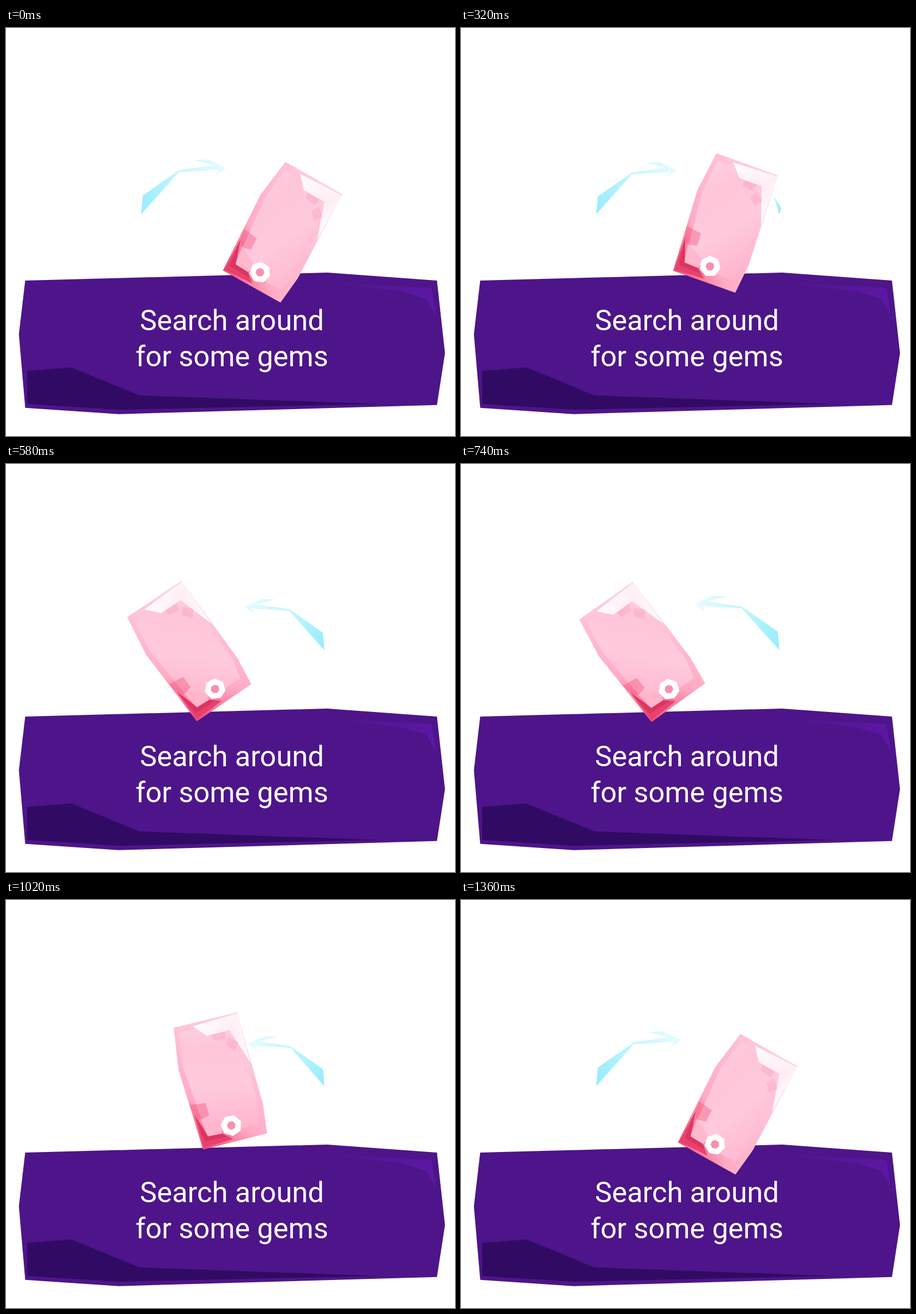
An HTML page that plays this animation: 784x714 px, repeating every 1480 ms.

```html
<!DOCTYPE html>
<html lang="en">
<head>
<meta charset="utf-8">
<title>Search around for some gems</title>
<style>
  html, body { margin: 0; width: 100%; height: 100%; overflow: hidden; background: #fff; }
  svg { display: block; width: 784px; height: 714px; }
  text { font: 400 50px Roboto, sans-serif; fill: #fff; text-anchor: middle; }
</style>
</head>
<body>
<svg viewBox="0 0 784 714">
  <defs>
    <linearGradient id="ice" gradientUnits="userSpaceOnUse" x1="0" y1="-10" x2="142" y2="-92">
      <stop stop-color="#98ecfd"/><stop offset=".5" stop-color="#c0f5fd"/>
      <stop offset="1" stop-color="#e6fcfe"/>
    </linearGradient>
    <linearGradient id="rim" gradientUnits="userSpaceOnUse" x1="350" y1="431" x2="494" y2="263">
      <stop stop-color="#ee4674"/><stop offset=".15" stop-color="#f8799b"/>
      <stop offset=".32" stop-color="#ffacc5"/><stop offset=".7" stop-color="#ffbfd4"/>
      <stop offset="1" stop-color="#fdd3e0"/>
    </linearGradient>
    <linearGradient id="glass" gradientUnits="userSpaceOnUse" x1="430" y1="412" x2="380" y2="215">
      <stop stop-color="#ffb3ca"/><stop offset=".45" stop-color="#ffcadd"/>
      <stop offset=".75" stop-color="#ffc5d9"/><stop offset="1" stop-color="#ffd0df"/>
    </linearGradient>
    <linearGradient id="shine" gradientUnits="userSpaceOnUse" x1="385" y1="215" x2="463" y2="285">
      <stop stop-color="#fff" stop-opacity=".95"/><stop offset=".5" stop-color="#fff" stop-opacity=".68"/>
      <stop offset="1" stop-color="#fff" stop-opacity=".9"/>
    </linearGradient>
    <linearGradient id="glow" gradientUnits="userSpaceOnUse" x1="545" y1="444" x2="750" y2="470">
      <stop stop-color="#4d1589"/><stop offset="1" stop-color="#5c17a4"/>
    </linearGradient>
    <path id="arrow" fill="url(#ice)"
      d="M0 0 3-33 66-77 126-86 92-95 117-96 149-81 131-69 136-78 66-74Z"/>
  </defs>

  <path fill="#4d1589" d="M33.5 442 561 428 752.5 442 766.5 569 752.5 659.7 197 675.7 33.5 664.7 22.5 536Z"/>
  <path fill="#310a63" d="M37 600 114 594 233 643 652 658 197 668 37 658Z"/>
  <path fill="url(#glow)" d="M545 444 743 455 750 502 733 473 686 460Z"/>
  <text x="394.5" y="529">Search around</text>
  <text x="394.5" y="592">for some gems</text>

  <use id="left" href="#arrow"/>
  <g transform="matrix(-1 0 0 1 792 0)"><use id="right" href="#arrow"/></g>

  <g id="phone">
    <path fill="url(#rim)" d="M343 212 457 207 470 373 467 425 352 431 337 285Z"/>
    <path fill="url(#glass)" d="M350 223 450 218 462 372 456 406 364 411 357 360 346 286Z"/>
    <path fill="url(#shine)" d="M376 216 457 209 463 299 438 235 397 237Z"/>
    <path fill="#f58bad" fill-opacity=".27" d="M405 237 430 236 427 249 407 247ZM434 247 449 259 440 273 427 260Z"/>
    <path fill="#f04a78" fill-opacity=".38" d="M344 350 372 352 374 374 357 380 349 369Z"/>
    <path fill="#dc3460" d="M349 368 365 410 390 410 407 423 354 428Z"/>
    <path fill="#ee4c7a" fill-opacity=".6" d="M349 368 358 418 400 417 407 423 354 428Z"/>
    <path fill="#ffb5cb" fill-opacity=".75" d="M357 377 393 394 388 410 365 410Z"/>
    <path fill="#f26c92" fill-opacity=".6" d="M391 404 404 402 407 421 390 410Z"/>
    <polygon id="button" fill="#fff"/>
    <polygon id="hole" fill="#f591ad"/>
  </g>
</svg>
<script>
const LOOP = 1480, STEP = 20, TURN = 620, END = 1360;
const RIGHT_TILT = 32.2, LEFT_TILT = -34;
const $ = id => document.getElementById(id);

const ramp = (t, from, to) => Math.min(1, Math.max(0, (t - from) / (to - from)));
const smooth = u => u * u * (3 - 2 * u);
const grow = (t, from, to) => 1 - (1 - ramp(t, from, to)) ** 4;
const shrink = (t, from, to) => 1 - ramp(t, from, to) ** 4;

// Same as CSS cubic-bezier(x1, 0, x2, 1), solved by bisection.
function ease(u, x1, x2) {
  let low = 0, high = 1;
  for (let i = 0; i < 24; i++) {
    const s = (low + high) / 2, r = 1 - s;
    if (3 * s * r * (x1 * r + x2 * s) + s ** 3 < u) low = s;
    else high = s;
  }
  return smooth(low);
}

function tiltAt(t) {
  const lean = ease(ramp(t, 0, TURN), .96, .78) - ease(ramp(t, TURN, END), .745, .551);
  return RIGHT_TILT + (LEFT_TILT - RIGHT_TILT) * lean;
}

function heptagon(id, radius) {
  $(id).setAttribute("points", Array.from({ length: 7 }, (_, i) => {
    const a = (i * 360 / 7 - 63) * Math.PI / 180;
    return [408.5 + radius * Math.cos(a), 399.3 + radius * Math.sin(a)];
  }).join(" "));
}

// Small arrows curl towards the middle.
function placeArrow(id, size) {
  const curl = 24 * smooth(ramp(size, .95, .4));
  $(id).setAttribute("transform", `translate(236 326) rotate(${-curl}) scale(${size})`);
}

function draw(now) {
  const t = Math.floor(now % LOOP / STEP) * STEP;
  const tilt = tiltAt(t);
  $("phone").setAttribute("transform", `rotate(${tilt} 377 474)`);
  $("glass").setAttribute("gradientTransform", `rotate(${-1.8 * tilt} 405 315)`);
  placeArrow("left", shrink(t, 80, 582) + grow(t, 1048, END));
  placeArrow("right", grow(t, 258, 908) * shrink(t, 590, END));
  requestAnimationFrame(draw);
}

heptagon("button", 18.5);
heptagon("hole", 7.7);
draw(0);
</script>
</body>
</html>
```
